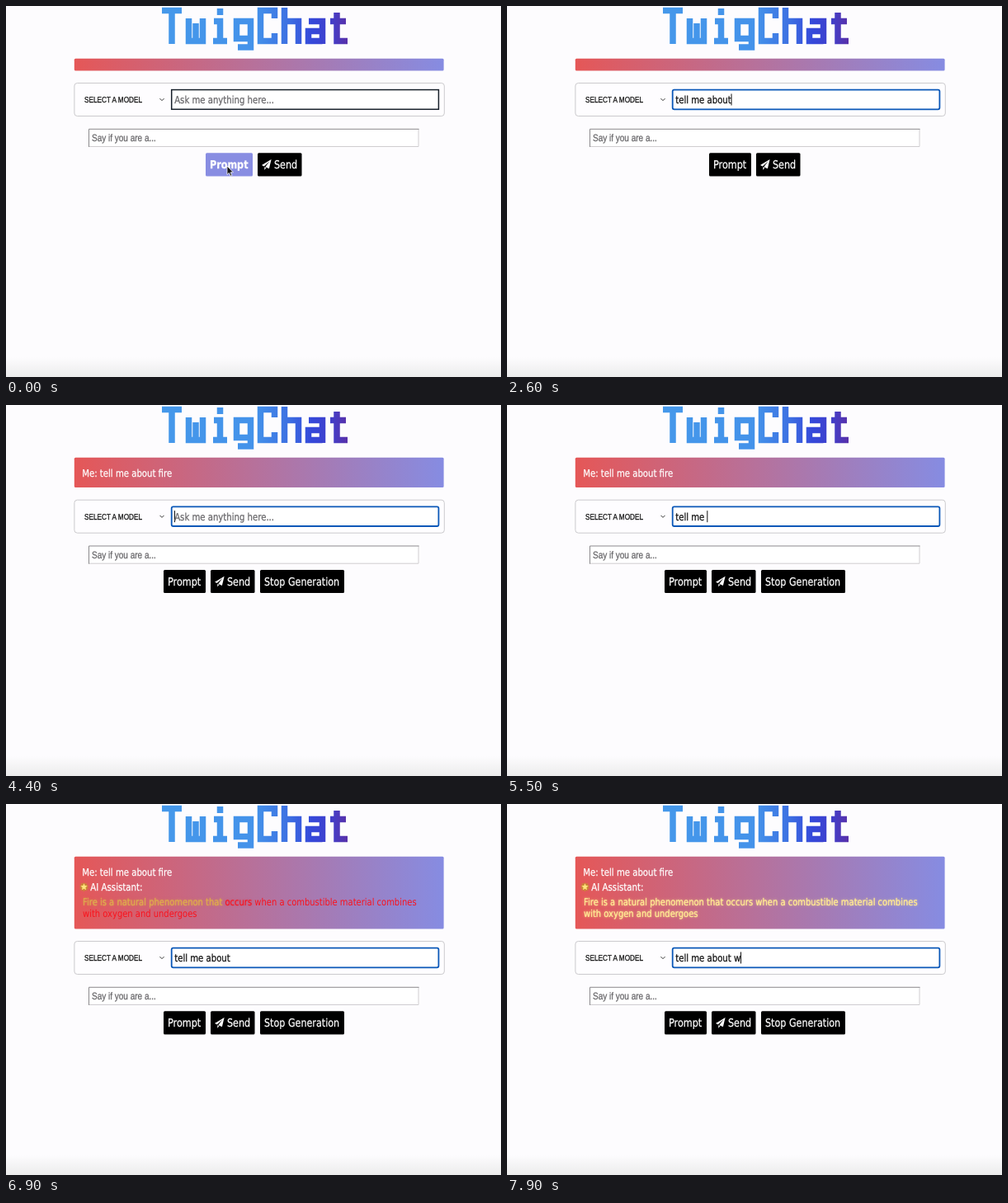
Animation of 600 by 450 pixels, one loop 8 s. Source, as an HTML page:

```html
<!DOCTYPE html>
<html lang="en">
<head>
<meta charset="utf-8">
<title>TwigChat</title>
<style>
  html, body { margin: 0; width: 100%; height: 100%; overflow: hidden; background: #fdfcfe; }
  #stage { position: relative; width: 600px; height: 450px; overflow: hidden; }
  svg { position: absolute; inset: 0; }
  text { font-family: "DejaVu Sans", Verdana, sans-serif; white-space: pre;
    text-rendering: geometricPrecision; stroke-width: .28px; }
  .plain { font-family: "Liberation Sans", Arial, sans-serif; }
  #answer { position: absolute; left: 92.5px; top: 112px; white-space: nowrap;
    font: 12px/14.4px "DejaVu Sans", Verdana, sans-serif; text-rendering: geometricPrecision;
    transform: scaleX(.83); transform-origin: 0 0; }
  #shade { position: absolute; left: 0; bottom: 0; width: 100%; height: 24px;
    background: linear-gradient(#ececec00, #ececec); }
</style>
</head>
<body>
<div id="stage">
  <div id="shade"></div>
  <svg width="600" height="450" viewBox="0 0 600 450">
    <defs>
      <linearGradient id="ink" gradientUnits="userSpaceOnUse" x1="189" y1="0" x2="415" y2="0">
        <stop offset="0" stop-color="#4598ea"/>
        <stop offset=".5" stop-color="#4492ea"/>
        <stop offset=".68" stop-color="#3d70e2"/>
        <stop offset=".8" stop-color="#3549da"/>
        <stop offset=".9" stop-color="#4040cc"/>
        <stop offset="1" stop-color="#5a30a8"/>
      </linearGradient>
      <linearGradient id="dusk">
        <stop stop-color="#e55757"/>
        <stop offset="1" stop-color="#868ce2"/>
      </linearGradient>
      <mask id="letters" maskUnits="userSpaceOnUse" x="180" y="0" width="240" height="60">
        <g id="wordmark" fill="none" stroke="#fff" stroke-width="7.5"></g>
      </mask>
    </defs>
    <rect x="180" width="240" height="60" fill="url(#ink)" mask="url(#letters)" role="img" aria-label="TwigChat"/>

    <rect id="panel" x="82.8" y="63.8" width="447.8" rx="1.5" fill="url(#dusk)"/>
    <g id="question"></g>
    <g id="reply">
      <path id="rays" fill="#c98a35"/>
      <path id="star" fill="#ffe27c"/>
    </g>

    <g id="form">
      <rect x="82.9" y="93.5" width="448.4" height="40" rx="3.5" fill="#fefdff" stroke="#cbcacd"/>
      <path d="M186.5 112.2l2.5 2.5 2.5-2.5" fill="none" stroke="#333"/>
      <rect id="field" x="200.7" y="101.6" width="323.7" height="23.7" fill="#fff"/>
      <rect id="caret" y="106.5" width="1" height="14" fill="#111"/>
      <rect x="100" y="149" width="400.5" height="22" fill="#fff"/>
      <path d="M500 149v21.5H100" fill="none" stroke="#cfcdd0"/>
      <path d="M100.5 171v-21.7H500.5" fill="none" stroke="#8b898d"/>
      <g id="prompt">
        <rect y="178.3" height="28.1" rx="1.5"/>
      </g>
      <g id="send">
        <rect y="178.3" width="53.5" height="28.1" rx="1.5"/>
        <path fill="#fff" d="M16.6 186L5 193.1l2.8 1.3 6.6-6-5.1 6.8 4.6 2.1zM8.3 195.3v3.6l2-2.6z"/>
      </g>
      <g id="stop">
        <rect x="308" y="178.3" width="102" height="28.1" rx="1.5"/>
      </g>
    </g>

    <path id="arrow" d="M0 0v10.6l2.4-2.2 1.7 3.8 1.8-.8-1.7-3.6h3.2z" fill="#111" stroke="#fff" stroke-width=".8"/>
    <path id="beam" d="M-2 -6h4M0 -6v12M-2 6h4" fill="none" stroke="#222"/>
  </svg>
  <div id="answer"></div>
</div>
<script>
const LOOP = 8000, SQUEEZE = .83;
const $ = id => document.getElementById(id);
const clamp = v => Math.max(0, Math.min(1, v));
const show = (el, on) => el.style.visibility = on ? 'visible' : 'hidden';
const mix = (a, b, k) => a.map((v, i) => v + (b[i] - v) * k);
const rgb = (c, alpha = 1) => `rgba(${c.map(Math.round)},${alpha})`;

// A thin stroke in the text colour gives the slightly heavy, soft type
function tint(el, color) {
  el.setAttribute('fill', color);
  el.setAttribute('stroke', color);
}

function label(parent, x, y, size, content, color = '#fff', cls = '') {
  const el = document.createElementNS('http://www.w3.org/2000/svg', 'text');
  el.setAttribute('transform', `translate(${x} ${y}) scale(${SQUEEZE} 1)`);
  el.setAttribute('font-size', size);
  el.setAttribute('class', cls);
  tint(el, color);
  el.textContent = content;
  $(parent).append(el);
  return el;
}

// Block letters, each in a cell 24 wide with the baseline at 46
const glyphs = {
  T: 'M0 5.5H24M12 5.5V46',
  w: 'M3.5 15V42.5H20.5V15M12 21V42.5',
  i: 'M5 18.5H12.5V42.5M4 42.5H21M12.5 3V11',
  g: 'M20.5 39.5H3.5V18.5H20.5V50H5',
  C: 'M20.5 15V5.5H3.5V42.5H20.5V33',
  h: 'M3.5 2V46M3.5 18.5H20.5V46',
  a: 'M4 18.5H20.5V46M20.5 42.5H3.5V30.5H20.5',
  t: 'M9 8V42.5H22M1 18.5H20'
};
$('wordmark').innerHTML = [...'TwigChat'].map((c, i) =>
  `<path d="${glyphs[c]}" transform="translate(${189 + i * 29} 0)"/>`).join('');

function starPath(points, outer, inner) {
  const corners = Array.from({ length: points * 2 }, (_, i) => {
    const r = i % 2 ? inner : outer, a = i * Math.PI / points - Math.PI / 2;
    return `${94.5 + r * Math.cos(a)} ${100.7 + r * Math.sin(a)}`;
  });
  return `M${corners.join('L')}z`;
}
$('rays').setAttribute('d', starPath(10, 6, 3.8));
$('star').setAttribute('d', starPath(5, 4.4, 2));

label('question', 92.3, 87, 12.2, 'Me: tell me about fire');
label('reply', 102.3, 104.8, 12.3, 'AI Assistant:');
label('form', 95, 117, 9.9, 'SELECT A MODEL', '#111', 'plain');
label('form', 104, 164, 12.05, 'Say if you are a...', '#68676a', 'plain');
const entry = label('form', 204.2, 118, 12.2, '');
const promptText = label('prompt', 5, 197.2, 13.5, 'Prompt');
label('send', 20, 197.2, 13.5, 'Send');
label('stop', 313, 197.2, 13.45, 'Stop Generation');

const lines = ['Fire is a natural phenomenon that occurs when a combustible material combines',
  'with oxygen and undergoes'];
$('answer').innerHTML = lines.map(line =>
  line.split(' ').map(word => `<span>${word}</span>`).join(' ')).join('<br>');
const words = [...document.querySelectorAll('#answer span')];

const SENT = 3300, REPLIED = 6400, FOCUSED = 600;
const first = 'tell me about fire', second = 'tell me about w';
const secondKeys = [4500, 4700, 4800, 5000, 5200, 5300, 5400, 5500,
  5600, 5700, 5800, 5900, 6000, 7700, 7900];
const caretOff = [[0, FOCUSED], [1100, 1400], [3800, 4400], [6500, 7000], [7500, 7700]];

function typed(t) {
  return t < SENT
    ? first.slice(0, Math.max(0, Math.floor((t - 1300) / 100)))
    : second.slice(0, secondKeys.filter(k => k <= t).length);
}

function drawField(t) {
  const value = typed(t), focus = t >= FOCUSED, field = $('field');
  entry.textContent = value || 'Ask me anything here...';
  tint(entry, value ? '#111' : '#68676a');
  const width = value ? entry.getComputedTextLength() * SQUEEZE : 0;
  $('caret').setAttribute('x', 204 + width);
  show($('caret'), !caretOff.some(([from, to]) => t >= from && t < to));
  field.setAttribute('stroke', focus ? '#0b58b8' : '#17202a');
  field.setAttribute('stroke-width', focus ? 1.8 : 1.5);
  field.setAttribute('rx', focus ? 2 : 0);
}

function drawButtons(t) {
  const hover = t < 200, sent = t >= SENT;
  const left = sent ? 191 : hover ? 242 : 245;
  const width = hover ? 57 : 51;
  const box = $('prompt').querySelector('rect');
  $('prompt').setAttribute('transform', `translate(${left} 0)`);
  $('send').setAttribute('transform', `translate(${left + width + 6} 0)`);
  box.setAttribute('width', width);
  box.setAttribute('fill', rgb(mix([136, 141, 226], [0, 0, 0], clamp((t - 100) / 300))));
  promptText.setAttribute('font-weight', hover ? 700 : 400);
  show($('stop'), sent);
}

function drawPointer(t) {
  const k = clamp(t / 400), ease = k * k * (3 - 2 * k);
  const x = 268 - 6 * ease, y = 194 - 78 * ease, overField = y < 126;
  for (const id of ['arrow', 'beam']) $(id).setAttribute('transform', `translate(${x} ${y})`);
  show($('arrow'), t < 700 && !overField);
  show($('beam'), t < 700 && overField);
}

const RED = [250, 18, 28], GOLD = [222, 168, 78], LEMON = [255, 232, 146];
function drawAnswer(t) {
  const bright = clamp((t - 6950) / 850);
  words.forEach((word, i) => {
    const since = t - REPLIED - i * 80, glow = clamp((since + 20) / 80);
    const color = mix(RED, mix(GOLD, LEMON, bright), clamp((since - 30) / 50));
    word.style.color = rgb(color);
    word.style.textShadow = `0 0 1px ${rgb(color, glow)}, 0 0 4px ${rgb(color, .7 * glow * glow)}`;
  });
}

function draw(t) {
  const sent = t >= SENT, replied = t >= REPLIED;
  const shift = replied ? 73 : sent ? 21.7 : 0;
  $('panel').setAttribute('height', 14.6 + shift);
  $('form').setAttribute('transform', `translate(0 ${shift})`);
  show($('question'), sent);
  show($('reply'), replied);
  show($('answer'), replied);
  drawField(t);
  drawButtons(t);
  drawPointer(t);
  if (replied) drawAnswer(t);
}

const start = performance.now();
function tick() {
  draw((performance.now() - start) % LOOP);
  requestAnimationFrame(tick);
}
tick();
</script>
</body>
</html>
```
